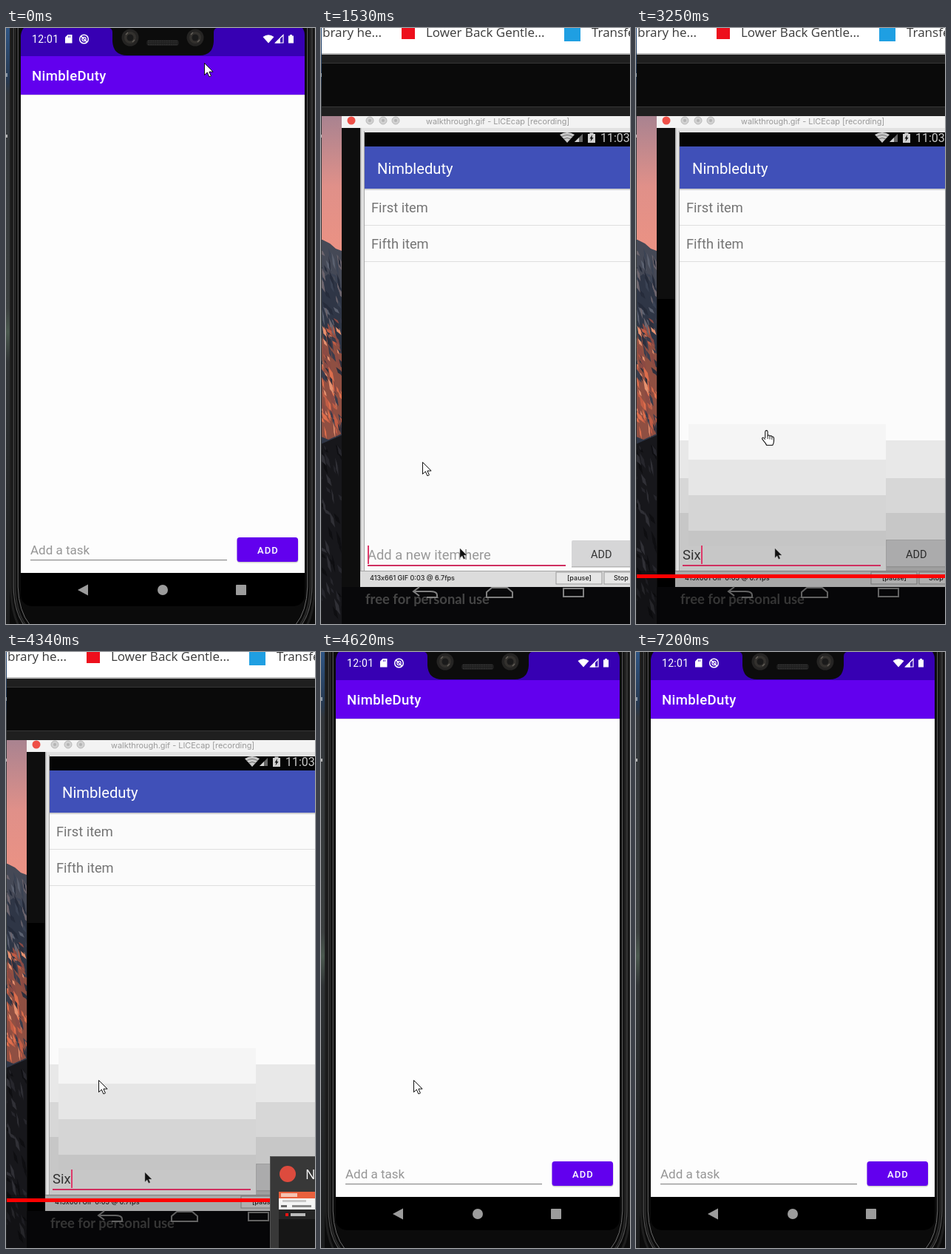
Write an HTML page that moves like this. It is 418 px wide and 805 px high and loops after 8 s.

```html
<!DOCTYPE html>
<html lang="en">
<head>
<meta charset="utf-8">
<title>To-do demo</title>
<style>
html, body { margin: 0; width: 100%; height: 100%; overflow: hidden; background: #0b0b0b; }
svg { display: block; width: 418px; height: 805px; }
text { font-family: Roboto, sans-serif; white-space: pre; }
.ui { font-family: "Open Sans", "Noto Sans", sans-serif; }
.mac { font-family: Inter, "Liberation Sans", sans-serif; }
.lato { font-family: Lato, sans-serif; }
</style>
</head>
<body>
<svg id="stage" viewBox="0 0 418 805" xmlns="http://www.w3.org/2000/svg"></svg>
<script>
const stage = document.getElementById('stage');
const LOOP = 8000;

const rect = (x, y, w, h, fill, more = '') =>
  `<rect x="${x}" y="${y}" width="${w}" height="${h}" fill="${fill}" ${more}/>`;
const circle = (x, y, r, fill, more = '') =>
  `<circle cx="${x}" cy="${y}" r="${r}" fill="${fill}" ${more}/>`;
const path = (d, fill, more = '') => `<path d="${d}" fill="${fill}" ${more}/>`;
const line = (d, stroke, w = 1, more = '') =>
  path(d, 'none', `stroke="${stroke}" stroke-width="${w}" ${more}`);
const text = (x, y, size, fill, str, more = '') =>
  `<text x="${x}" y="${y}" font-size="${size}" fill="${fill}" ${more}>${str}</text>`;
const group = (id, body, more = '') => `<g id="${id}" ${more}>${body}</g>`;

let seed = 11;
const rand = () => (seed = seed * 16807 % 2147483647) / 2147483647;

const defs = `<defs>
  <clipPath id="pane">${rect(1, 0, 417, 805, '#000')}</clipPath>
  <clipPath id="peak">${rect(-60, 119, 88, 700, '#000')}</clipPath>
  <linearGradient id="sky" x1="0" y1="0" x2="0" y2="1">
    <stop offset="0" stop-color="#a98390"/><stop offset=".5" stop-color="#e09089"/>
    <stop offset="1" stop-color="#ec9283"/></linearGradient>
  <linearGradient id="edge" x1="0" y1="0" x2="0" y2="1">
    <stop offset="0" stop-color="#2f5584"/><stop offset=".09" stop-color="#27384e"/>
    <stop offset=".11" stop-color="#33363a"/><stop offset=".47" stop-color="#3c4040"/>
    <stop offset=".51" stop-color="#4c5a50"/><stop offset=".56" stop-color="#303335"/>
    <stop offset="1" stop-color="#1c1d1e"/></linearGradient>
</defs>`;

function lens(x) {
  return circle(x, 13, 11.5, '#252423') + circle(x, 13, 8, '#33312e') +
    circle(x, 13, 4.5, '#1a1a1a') + line(`M${x - 6} 9l3 -3M${x + 3} 19l3 -3`, '#66625c', 1.3);
}

function speaker() {
  let s = rect(190, 16, 44, 8, '#1c1c1c', 'rx="4"');
  for (let y = 17.5; y < 24; y += 2.5)
    s += line(`M192 ${y}H232`, '#454545', 1.1, 'stroke-dasharray="1.2 1.2"');
  return s;
}

function phone() {
  const rim = (x, r, color, w) =>
    line(`M${x} 0V755Q${x + 1} 788 ${x + r} 806`, color, w) +
    line(`M${424 - x} 0V755Q${423 - x} 788 ${424 - x - r} 806`, color, w);
  return rect(0, 0, 418, 805, '#0b0b0b') +
    rect(0, 0, 5, 805, 'url(#edge)') + rect(0, 61, 2, 5, '#8a99a8') + rect(0, 144, 2, 4, '#b5b5b5') +
    rim(6.5, 10, '#1f1f1f', 3) + rim(10, 14, '#575757', 1.2) + rim(12.5, 14, '#2b2b2b', 2) +
    rim(16.2, 16, '#6a6a6a', 1) +
    rect(20, 700, 384, 81, '#000', 'rx="15"') +
    path('M20 38V10Q21 3 24 0H401Q404 4 404 10V38Z', '#3700b3') +
    rect(20, 38, 384, 52, '#6200ee') +
    rect(20, 90, 384, 646, '#fdfdfd') + rect(20, 90, 384, 1, '#dcd8e2') +
    path('M140 0Q144 1 144 6V18Q145 37 164 37H262Q280 37 281 18V6Q281 1 285 0Z', '#0c0c0c') +
    lens(168) + lens(256) + speaker() +
    text(35, 20, 14, '#fff', '12:01', 'letter-spacing=".3"') +
    path('M83.5 9H89.5V20.5H80V12.5Z', '#fff') + line('M84.5 10.5v2.5M86.5 10.5v2.5', '#3700b3', .8) +
    circle(105.5, 15, 5.8, 'none', 'stroke="#fff" stroke-width="1.5"') +
    circle(105.5, 15, 2.6, 'none', 'stroke="#fff" stroke-width="1.2"') + line('M101.5 11l8 8', '#fff', 1.4) +
    path('M347.5 12Q355 6.5 362.5 12L355 20.5Z', '#fff') +
    path('M364.5 20L375 9.5V20Z', 'none', 'stroke="#fff" stroke-width="1.2"') +
    path('M364 20.5L371 13.5V20.5Z', '#fff') +
    path('M382 10.5H384V9H387V10.5H389V20.5H382Z', '#fff') +
    text(35, 71, 18.6, '#fff', 'NimbleDuty', 'font-weight="500" letter-spacing=".35"') +
    text(33, 711, 17, '#969696', 'Add a task') + rect(33, 718, 266, 1.2, '#8b8b8b') +
    rect(312.5, 689.5, 83, 33, '#000', 'rx="4" opacity=".18"') +
    rect(312.5, 688, 82.5, 33, '#6200ee', 'rx="3.5"') +
    text(340, 709.5, 13, '#fff', 'ADD', 'font-weight="500" letter-spacing="1.1"') +
    path('M97 759L111 751.5V766.5Z', '#9c9c9c') + circle(212, 759, 7, '#9c9c9c') +
    rect(311, 752, 14, 14, '#9c9c9c', 'rx="1"');
}

function mountain() {
  let s = rect(-60, 119, 88, 190, 'url(#sky)') +
    path('M-60 298L-40 284L-26 292L-10 287L2 286L12 291L20 298L28 301V806H-60Z', '#454956') +
    path('M-60 340L-30 322L-8 345L10 332L28 352V806H-60Z', '#2f3646') +
    path('M-60 425L-36 395L-24 430L-6 385L6 428L16 402L28 440V548L10 556L-14 546L-60 566Z', '#8f4f42');
  const shards = (n, y0, h, colors) => {
    for (let i = 0; i < n; i++) {
      const x = -60 + rand() * 88, y = y0 + rand() * h, w = 2 + rand() * 5, d = 5 + rand() * 16;
      s += path(`M${x} ${y}l${w} ${d * .5}l${w * .4} ${d * .7}l${-w} ${-d * .4}Z`,
        colors[Math.floor(rand() * colors.length)]);
    }
  };
  shards(90, 296, 100, ['#5b6170', '#262c3b', '#3b4354', '#6e666e']);
  shards(240, 385, 155, ['#dd6e4c', '#c25d45', '#2c2f3d', '#3a3c4c', '#8b4a44', '#e6916f']);
  s += path('M-60 560L-30 552L0 562L28 550V806H-60Z', '#17171b');
  shards(130, 556, 230, ['#26262c', '#0e0e11', '#303036']);
  return `<g clip-path="url(#peak)">${s}</g>`;
}

const arrow = 'M0 0V16L3.8 12.5L6.4 18.4L8.9 17.3L6.4 11.6H11.6Z';

function browser() {
  const dots = [66, 84, 101].map(x =>
    circle(x, 125, 5, '#d2d2d2', 'stroke="#b9b9b9"') + circle(x, 125, 2, '#b4b4b4')).join('');
  const navIcon = d => line(d, '#808080', 2);
  return rect(-60, -140, 600, 120, '#eae4ee') + rect(-60, -20, 600, 55, '#fff') +
    text(82, 12, 17, '#3b3b3b', 'dard library he...', 'class="ui" text-anchor="end"') +
    rect(109, -3, 18, 18, '#ed0f1c') +
    text(142, 12, 17, '#3b3b3b', 'Lower Back Gentle...', 'class="ui"') +
    rect(329, -4, 22, 22, '#1f9fe2') + text(366, 12, 17, '#3b3b3b', 'Transfer data', 'class="ui"') +
    rect(-60, 34, 600, 2, '#b9b9b9') + rect(-60, 36, 600, 800, '#1f1f1f') +
    rect(-60, 47, 600, 60, '#0a0a0a') + rect(-60, 47, 600, 1, '#363636') + rect(-60, 106, 600, 1, '#363636') +
    rect(-60, 119, 600, 700, '#08080a') + mountain() +
    rect(28, 135, 25, 620, '#0e0e0e') + rect(28, 119, 512, 16, '#f3f3f3') +
    circle(41, 125, 5.5, '#ee5048') + dots +
    text(142, 129.5, 10.9, '#9a9a9a', 'walkthrough.gif - LICEcap [recording]', 'class="mac"') +
    rect(53, 135, 487, 620, '#e2e2e2') + rect(53, 135, 1.5, 620, '#b0b0b0') + rect(58, 139, 1, 594, '#a8a8a8') +
    rect(59, 141, 480, 19, '#050505') +
    path('M323 144Q333 138 343 144L333 155Z', '#c9c9c9') + line('M325 147Q333 142 341 147M328 150Q333 147 338 150', '#555', .8) +
    path('M343 154L354 143V154Z', '#666') + path('M343 154L349 148V154Z', '#d2d2d2') +
    path('M361 143H363.5V141.5H368.5V143H371V155H361Z', '#d0d0d0') + path('M367 144l-3.5 5.5h2l-1 4l4 -5.5h-2Z', '#111') +
    text(378, 154, 16, '#c8c8c8', '11:03') +
    rect(59, 160, 480, 57, '#4050b8') + text(76, 197, 20.2, '#fff', 'Nimbleduty') +
    rect(59, 217, 480, 516, '#fbfbfb') + rect(59, 217, 480, 2, '#d0d0d0') +
    text(68, 248.5, 18.3, '#747474', 'First item') + rect(59, 266, 480, 1, '#dedede') +
    text(68, 298, 18.3, '#747474', 'Fifth item') + rect(59, 315, 480, 1, '#dedede') +
    group('shade', shade()) +
    rect(339, 692, 110, 36, '#d6d6d7', 'rx="2"') + rect(339, 727, 110, 1.5, '#b5b5b5') +
    text(365, 716, 14.5, '#333', 'ADD') +
    text(63, 718, 18.4, '#333', '', 'id="typed"') +
    rect(63, 725, 268, 2, '#cf2f60') + rect(88, 699, 2, 25, '#dd3a6a', 'id="caret"') +
    path(arrow, '#111', 'transform="translate(188 703) scale(.78)" stroke="#777" stroke-width=".6"') +
    rect(53, 733, 487, 22, '#dcdcdc') + rect(53, 733, 487, 1, '#a5a5a5') +
    text(66, 745.5, 9, '#222', '', 'id="info" class="mac" font-weight="500"') +
    rect(318, 735, 62, 16, '#e6e6e6', 'stroke="#999"') + text(333, 746, 9, '#222', '[pause]', 'class="mac" font-weight="500"') +
    rect(383, 735, 62, 16, '#e6e6e6', 'stroke="#999"') + text(396, 746, 9, '#222', 'Stop', 'class="mac" font-weight="500"') +
    text(60, 778, 18.4, '#454545', 'free for personal use', 'class="lato" font-weight="700"') +
    navIcon('M133 755L125 761L133 767M125 761H148Q157 761 157 766V769H143') +
    navIcon('M224 769V762L231 756H252L259 762V769Z') + navIcon('M328 757H355V768H328Z') +
    group('controls', controls());
}

// Player shade falls in flat bands; a narrower block has its own band edges
const band = (x, y, w, a, end = 805) => rect(x, y, w, end - y, '#000', `opacity="${a}"`);

function shade() {
  const wide = [557, 608, 655].map(y => band(59, y, 480, .075, 733)).join('');
  const block = ['#f5f5f5', '#e6e6e6', '#d5d5d5', '#c5c5c5'].map((c, i) =>
    rect(71, 535 + i * 48, 267, 165 - i * 48, c)).join('');
  return wide + group('block', block);
}

function controls() {
  return rect(29, 0, 24, 755, '#000', 'id="gutter"') +
    band(338, 691, 200, .2, 733) + band(0, 733, 540, .24) + rect(0, 738, 540, 5, '#f00');
}

const bezel = group('bezel', circle(0, 0, 35, '#000', 'opacity=".5"') +
  rect(-11, -13, 8, 26, '#fff') + rect(3, -13, 8, 26, '#fff'));

const popup = group('popup', rect(357, 681, 70, 130, '#383838') + rect(357, 681, 70, 1, '#555') +
  rect(357, 681, 1, 130, '#555') + circle(381, 705, 11, '#dd4b3e') +
  text(405, 712, 18, '#fff', 'Nimble', 'class="ui"') +
  rect(369, 729, 60, 80, '#161616') + rect(369, 729, 60, 9, '#e9603d') +
  rect(372, 731, 22, 5, '#f6c3b2') + rect(369, 738, 60, 15, '#f5f5f5') +
  rect(374, 740, 32, 3, '#c9c9c9') + rect(372, 747, 8, 3, '#666') + rect(387, 747, 26, 3, '#888') +
  rect(369, 753, 60, 13, '#252525') + rect(378, 758, 4, 4, '#e11') + rect(385, 758, 20, 4, '#bbb'));

const hand = path('M4.8 11V2.2Q5 .6 6.5 .6Q8 .6 8.1 2.2V8Q8.4 6.8 9.8 7Q11 7.2 11 8.6Q11.5 7.4 12.8 7.8Q13.9 8.2 13.9 9.5Q14.5 8.7 15.6 9.2Q16.5 9.7 16.5 11V15Q16.3 18 14.8 20.5H6.6Q5.8 18 3.6 15.8L.9 12.4Q.2 10.9 1.5 10.3Q2.8 10 4.8 12.8',
  '#fff', 'stroke="#111" stroke-width="1.1" stroke-linejoin="round"') +
  line('M8.1 8v4M11 9v3.5M13.9 10v3', '#111', .9);

stage.innerHTML = defs + phone() +
  `<g clip-path="url(#pane)">${group('browser', browser())}${bezel}</g>` + popup +
  group('arrow', path(arrow, '#fff', 'stroke="#111" stroke-width="1"')) + group('hand', hand);

const el = {};
stage.querySelectorAll('[id]').forEach(n => el[n.id] = n);

// Each row: start time, then the values held from there on
const pointer = [
  [0, 268.5, 47.5], [130, 264, 190], [250, 268, 346], [400, 245.5, 462], [550, 196.5, 523],
  [700, 160, 552], [820, 139.5, 571], [980, 138.5, 585], [1130, 137.5, 586.5], [2040, 154, 490.5],
  [2190, 202.5, 411.5], [2310, 220, 380], [2440, 232, 367], [2560, 236, 366.5], [2830, 224, 500],
  [2980, 198, 503], [3100, 179, 507], [3250, 170, 543, 1], [3400, 151, 562, 1], [3520, 133, 572, 1],
  [3670, 125.5, 578.5], [6530, 122.5, 571], [6650, 122.5, 570], [6770, -40, 0],
  [6920, 287.5, 799.5], [7200, -40, 0]
];
// start, opacity, scale
const pane = [[0, 0, 1], [1130, .7, .944], [1280, .94, .987], [1410, 1, 1], [4490, .4, .96], [4620, 0, 1]];
// start, text, colour, caret x
const typing = [[0, 'Add a new item here', '#999', 63], [2190, 'S', '#333', 0], [2440, 'Si', '#333', 78], [2560, 'Six', '#333', 88]];

const at = (rows, t) => rows.reduce((a, r) => r[0] <= t ? r : a);
const show = (node, on) => node.setAttribute('opacity', +on);

function draw(t) {
  const [, x, y, isHand] = at(pointer, t);
  const active = isHand ? el.hand : el.arrow;
  show(el.hand, !!isHand);
  show(el.arrow, !isHand);
  active.setAttribute('transform', `translate(${x} ${y})`);

  const [, alpha, k] = at(pane, t), off = (1 - k) / .056;
  show(el.browser, alpha);
  el.browser.setAttribute('transform', `translate(${41.5 * off} ${61.5 * off}) scale(${k})`);

  const [, str, color, caret] = at(typing, t);
  el.typed.textContent = str;
  el.typed.setAttribute('fill', color);
  show(el.caret, caret > 0);
  el.caret.setAttribute('x', caret);
  el.info.textContent = t < 2190 ? '413x661 GIF 0:03 @ 6.7fps'
    : t < 2560 ? '415x661 GIF 0:04 @ 6.7fps' : '415x661 GIF 0:05 @ 6.7fps';

  const controlsOn = t < 2190 ? 0 : t < 2310 ? .9 : 1;
  show(el.controls, controlsOn);
  show(el.shade, controlsOn);
  show(el.block, t >= 2680);
  const top = t < 2440 ? 411 : 366;
  el.gutter.setAttribute('y', top);
  el.gutter.setAttribute('height', 755 - top);

  const b = [2830, 2980, 3100].filter(s => s <= t).length;
  show(el.bezel, t >= 2680 && b < 3 ? .45 - .15 * b : 0);
  el.bezel.setAttribute('transform', `translate(290.5 443) scale(${1.4 + .3 * b})`);

  show(el.popup, t < 4210 || t >= 4490 ? 0 : t < 4340 ? .5 : 1);
}

function tick() {
  draw(performance.now() % LOOP);
  requestAnimationFrame(tick);
}
tick();
</script>
</body>
</html>
```
